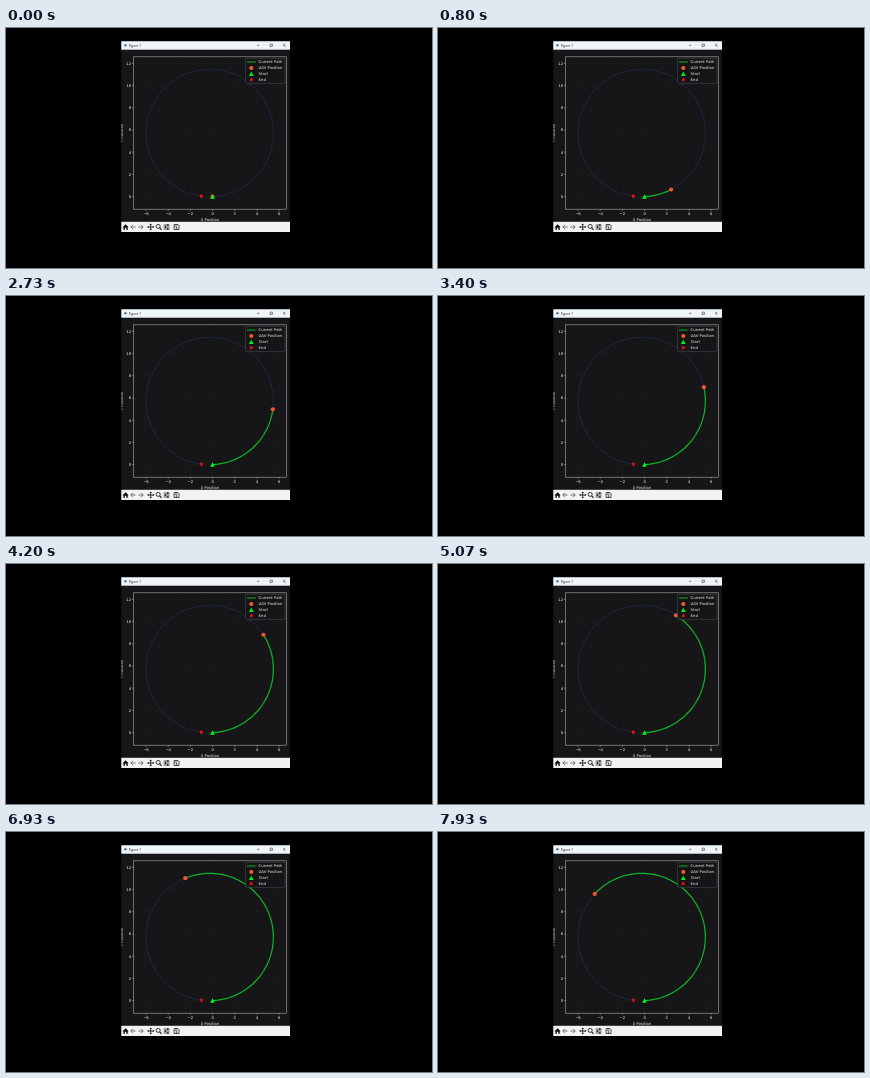
An HTML page that plays this animation: 426x240 px, repeating every 8 s.

```html
<!DOCTYPE html>
<html lang="en">
<head>
<meta charset="utf-8">
<title>Path plot</title>
<style>
  html, body { margin: 0; width: 100%; height: 100%; overflow: hidden; background: #000; }
  svg { display: block; width: 100vw; height: 100vh; }
  .plot text { font: 3.8px "DejaVu Sans", sans-serif; fill: #f2f2f2; }
  .bar text { font: 3.3px "Open Sans", sans-serif; fill: #222; }
  .mid { text-anchor: middle; }
  .end { text-anchor: end; }
  .icons { fill: none; stroke: #222; stroke-width: .9; }
</style>
</head>
<body>
<svg viewBox="0 0 426 240">
  <defs>
    <clipPath id="win"><rect x="115.3" y="13.3" width="168.7" height="190.7"/></clipPath>
    <path id="tri" d="M0 -2.3 L2.4 2 H-2.4 Z" fill="#00f010"/>
    <path id="cross" d="M-1.3 -1.2 L1.3 1.2 M-1.3 1.2 L1.3 -1.2" stroke="#d0101a" stroke-width="1.6"/>
    <circle id="dot" r="2.1" fill="#f4552f"/>
  </defs>
  <g clip-path="url(#win)">
    <rect x="115" y="13" width="170" height="192" fill="#161618"/>

    <g class="plot">
      <g id="grid" stroke="#28282e" stroke-width=".4" stroke-dasharray="1.5 .7"></g>
      <path id="plan" fill="none" stroke="#1c2c4a" stroke-width=".8"/>
      <path id="trail" fill="none" stroke="#0cb41c" stroke-width="1.2" stroke-linejoin="round"/>
      <use id="finish" href="#cross"/>
      <use id="uav" href="#dot"/>
      <use id="start" href="#tri"/>
      <rect x="127.6" y="28.8" width="152.8" height="152.4" fill="none" stroke="#aaa" stroke-width=".6"/>
      <g id="ticks" stroke="#bbb" stroke-width=".5"></g>
      <g id="labels"></g>
      <text class="mid" x="204" y="192.7">X Position</text>
      <text class="mid" transform="translate(117.2 105) rotate(-90)">Y Position</text>

      <rect x="239.6" y="30.2" width="39.4" height="25.2" rx=".8" fill="#161618" fill-opacity=".8" stroke="#50505c" stroke-width=".5"/>
      <path d="M241 34 H249.6" stroke="#0cb41c" stroke-width="1"/>
      <use href="#dot" x="245.3" y="40"/>
      <use href="#tri" x="245.3" y="46"/>
      <use href="#cross" x="245.3" y="51.7"/>
      <text x="252.6" y="35.3">Current Path</text>
      <text x="252.6" y="41.2">UAV Position</text>
      <text x="252.6" y="47.1">Start</text>
      <text x="252.6" y="53">End</text>
    </g>

    <g class="bar">
      <rect x="115" y="13" width="170" height="8.7" fill="#eef5f8"/>
      <circle cx="119.4" cy="17.2" r="1.3" fill="#5b7f9c"/>
      <text x="122.8" y="18.5">Figure 1</text>
      <path d="M251 17.3 H253.4 M264.1 16.1 h2.3 v2.3 h-2.3 Z M277.1 16 l2.4 2.4 M279.5 16 l-2.4 2.4"
            fill="none" stroke="#333" stroke-width=".6"/>
      <rect x="115" y="193.8" width="170" height="10.4" fill="#f2f2f2"/>
    </g>

    <g class="icons">
      <path d="M116.5 199.2 L119.6 196.2 L122.7 199.2 H121.8 V201.8 H120.3 V199.8 H118.9 V201.8 H117.4 V199.2 Z"
            fill="#111" stroke="none"/>
      <path d="M129.7 199 H124.8 M127 196.8 L124.8 199 L127 201.2 M132.3 199 H137.2 M135 196.8 L137.2 199 L135 201.2"
            stroke="#666"/>
      <path d="M141.8 199 H147.6 M144.7 196.1 V201.9"/>
      <path d="M141.2 199 l1.4 -1.2 v2.4 Z M148.2 199 l-1.4 -1.2 v2.4 Z M144.7 195.5 l-1.2 1.4 h2.4 Z M144.7 202.5 l-1.2 -1.4 h2.4 Z"
            fill="#222" stroke="none"/>
      <circle cx="152.2" cy="198.4" r="2"/>
      <path d="M153.6 199.8 L155.6 201.9" stroke-width="1.2"/>
      <path d="M157.6 197 H163.6 M157.6 199 H163.6 M157.6 201 H163.6" stroke-width=".8"/>
      <path d="M161.8 196.1 v1.8 M159.4 198.1 v1.8 M161.8 200.1 v1.8" stroke-width="1.1"/>
      <path d="M168.1 196.5 H172 L173 197.5 V201.5 H168.1 Z M169 198.1 H171.6" stroke-width=".8"/>
      <circle cx="170.5" cy="200" r=".8" fill="#222" stroke="none"/>
    </g>
  </g>
</svg>
<script>
  const LOOP = 8000, FPS = 15;
  const STEP_MS = 176.5, LEAD = 0.96;
  const LAST = 70;
  const CENTER = { x: 203.7, y: 105 }, RADIUS = 63.7;
  const ORIGIN = { x: 206.6, y: 168.6 }, UNIT = 11.1;

  const $ = id => document.getElementById(id);

  function add(parent, name, attrs, text) {
    const el = document.createElementNS("http://www.w3.org/2000/svg", name);
    for (const key in attrs) el.setAttribute(key, attrs[key]);
    if (text !== undefined) el.textContent = text;
    $(parent).append(el);
  }

  // Waypoints run counter-clockwise from the bottom, five degrees apart.
  function waypoint(i) {
    const a = (2.5 + 5 * i) * Math.PI / 180;
    return [CENTER.x + RADIUS * Math.sin(a), CENTER.y + RADIUS * Math.cos(a)];
  }

  function route(n) {
    const points = Array.from({ length: n + 1 }, (_, i) => waypoint(i).map(v => v.toFixed(2)).join(" "));
    return "M" + points.join(" L");
  }

  function place(id, i) {
    const [x, y] = waypoint(i);
    $(id).setAttribute("transform", `translate(${x.toFixed(2)} ${y.toFixed(2)})`);
  }

  for (let v = -6; v <= 6; v += 2) {
    const x = ORIGIN.x + v * UNIT;
    add("grid", "path", { d: `M${x} 29 V181` });
    add("ticks", "path", { d: `M${x} 181.2 v1.6` });
    add("labels", "text", { x, y: 187.1, class: "mid" }, String(v).replace("-", "\u2212"));
  }
  for (let v = 0; v <= 12; v += 2) {
    const y = ORIGIN.y - v * UNIT;
    add("grid", "path", { d: `M128 ${y} H280` });
    add("ticks", "path", { d: `M126 ${y} h1.6` });
    add("labels", "text", { x: 125.1, y: y + 1.4, class: "end" }, v);
  }
  $("plan").setAttribute("d", route(LAST));
  place("start", 0);
  place("finish", LAST);

  function draw(t) {
    const tick = Math.floor((t + 4) * FPS / 1000);
    const step = Math.floor(LEAD + tick * 1000 / FPS / STEP_MS);
    $("trail").setAttribute("d", route(step));
    place("uav", step);
  }

  const began = performance.now();
  function loop() {
    draw((performance.now() - began) % LOOP);
    requestAnimationFrame(loop);
  }
  draw(0);
  requestAnimationFrame(loop);
</script>
</body>
</html>
```
